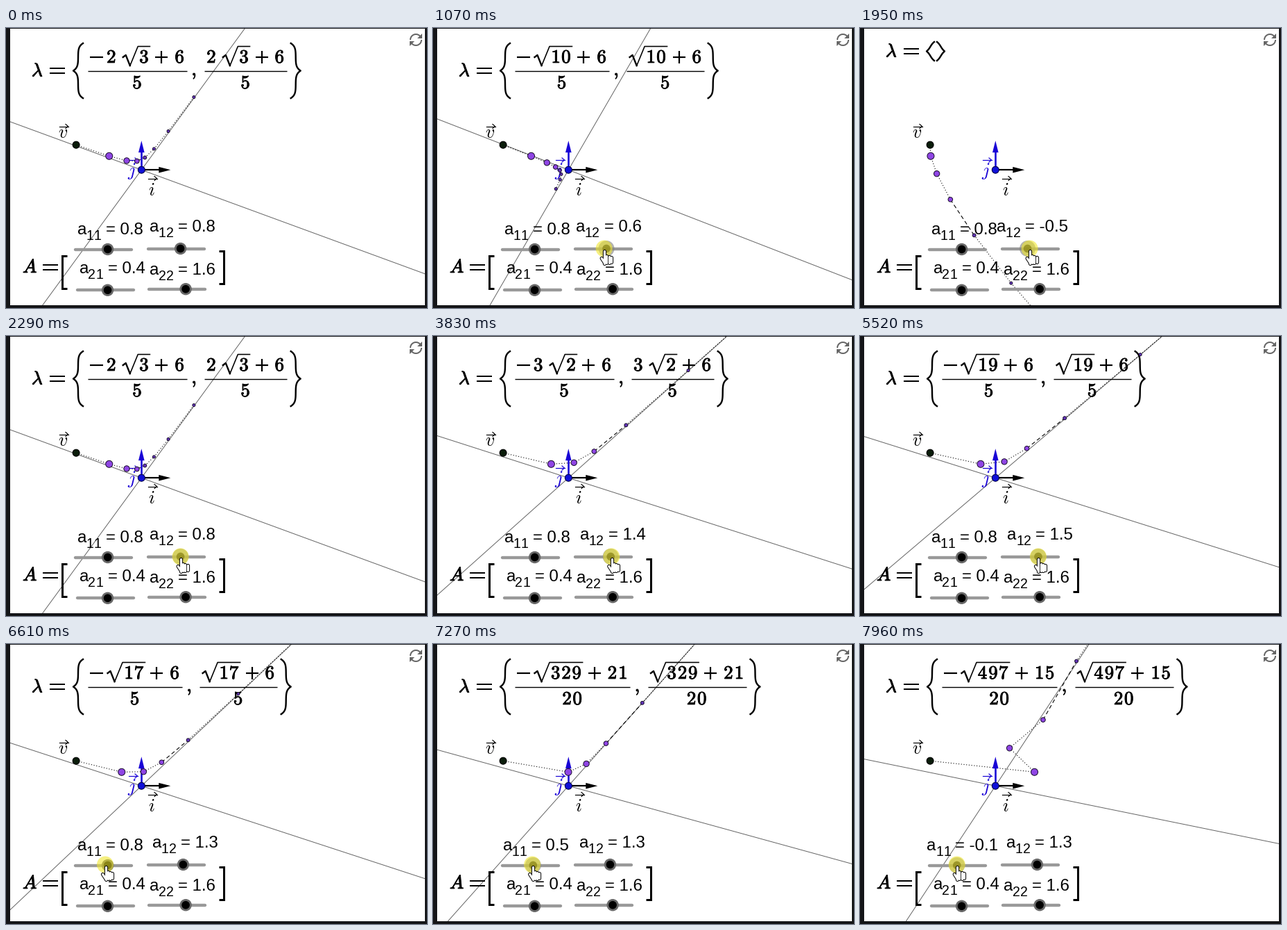
A matplotlib script for the animation above (8000 ms loop, 607 by 403 pixels).

```python
import math
import numpy as np
import matplotlib.pyplot as plt
from matplotlib.animation import FuncAnimation
from matplotlib.patches import Arc, Circle, Polygon, Rectangle
import matplotlib.patheffects as pe

W, H, DPI = 607, 403, 64          # dpi 64 keeps the pixel size exact
PT = 72 / DPI                     # points per pixel
STEP, FRAMES = 40, 200

plt.rcParams["mathtext.fontset"] = "cm"
plt.rcParams["font.family"] = "Liberation Sans"

fig = plt.figure(figsize=(W / DPI, H / DPI), dpi=DPI, facecolor="white")
ax = fig.add_axes([0, 0, 1, 1])
ax.set_xlim(0, W)
ax.set_ylim(H, 0)
ax.axis("off")

ORIGIN = np.array([195.3, 204.2])
FLIP = np.array([1, -1])
START = np.array([-94.2, 36.0])
BLUE, PURPLE, INK, GREY = "#1800d6", "#8f45e4", "#000000", "#666666"

# name: track middle, track y, label offset from the knob, text baseline
SLIDERS = {
    "11": (140.5, 318.5, -43.5, 297),
    "12": (245.4, 317.5, -44.5, 293),
    "21": (143.5, 377.3, -41, 353),
    "22": (246.8, 375.7, -51.8, 355),
}
MATRIX = {"11": .8, "12": .8, "21": .4, "22": 1.6}

# slider, begin, end, value reached
DRAGS = [
    ("12", 1030, 1470, -1.2), ("12", 1760, 2290, .8), ("12", 2520, 2840, 1.3),
    ("12", 3790, 4260, 2.1), ("12", 4620, 5390, 1.8), ("12", 5480, 5520, 1.5),
    ("12", 5680, 5860, 1.3),
    ("11", 6650, 6810, .7), ("11", 7040, 7410, .3), ("11", 7580, 7960, -.1),
]
LEAD = 100                        # the pointer runs ahead of the knob, in ms

live = []


def keep(artist):
    live.append(artist)
    return artist


def ramp(t, begin, end):
    return min(max((t - begin) / (end - begin), 0), 1)


def setting(name, t):
    v = MATRIX[name]
    for slider, begin, end, goal in DRAGS:
        if slider == name:
            v += (goal - v) * ramp(t, begin, end)
    return v


def knob_x(name, value):
    return SLIDERS[name][0] + 7.7 * value


def line(xs, ys, width=1.0, color=INK, z=4, **kw):
    return keep(ax.plot(xs, ys, lw=width * PT, color=color, zorder=z, **kw)[0])


def stroke(x0, y0, x1, y1, width):
    line([x0, x1], [y0, y1], width, solid_capstyle="butt")


def disc(x, y, r, color, z=5, edge="none", **kw):
    keep(ax.add_patch(Circle((x, y), r, fc=color, ec=edge, lw=PT, zorder=z, **kw)))


def text(x, y, s, size, color=INK, ha="left", bold=0.0):
    t = keep(ax.text(x, y, s, fontsize=size * PT, color=color, ha=ha,
                     va="baseline", zorder=4))
    if bold:
        t.set_path_effects([pe.withStroke(linewidth=bold * PT, foreground=color)])


def bold_char(x, y, c):
    text(x, y, rf"$\mathbf{{{c}}}$", 27, ha="center", bold=.9)


def equals(x, y):
    for dy in (-3.6, 3.6):
        stroke(x, y + dy, x + 22, y + dy, 2)


def brace(x, yc, h, w, side):
    """Curly brace; side 1 opens right, -1 opens left."""
    s = np.linspace(-1, 1, 81)
    p = h / 9
    bend = np.abs(s) ** p - (1 - np.abs(s)) ** p
    line(x + w / 2 * (1 + side * bend), yc + s * h / 2, 2.4)


ADVANCE = {"-": 24, "+": 36, " ": 7, "r": 25}


def width(s):
    return sum(ADVANCE.get(c, 15.2) for c in s)


def formula(s, x, base):
    """Draw digits, signs and a radical ('r') from left to right."""
    mid = base - 8
    for k, c in enumerate(s):
        step = ADVANCE.get(c, 15.2)
        if c == "-":
            stroke(x, mid, x + 19, mid, 2.2)
        elif c == "+":
            cx = x + 17.5
            stroke(cx - 9, mid, cx + 9, mid, 2.2)
            stroke(cx, mid - 9, cx, mid + 9, 2.2)
        elif c == "r":
            top, end = base - 23.5, x + step + width(s[k + 1:].split("+")[0]) + .5
            line([x + 2, x + 6, x + 12], [mid, mid - 3, base + 4], 2.4)
            line([x + 12, x + 23.5, end], [base + 4.5, top, top], 1.6)
        elif c != " ":
            bold_char(x + step / 2, base, c)
        x += step


def eigenvalues(a11, a12, a21, a22):
    """Exact eigenvalues as (numerator, denominator) strings."""
    p, q, r, s = (round(10 * v) for v in (a11, a12, a21, a22))
    tr, d = p + s, (p - s) ** 2 + 4 * q * r
    if d < 0:
        return []
    root = math.isqrt(d)
    if root * root == d:
        pairs = [(n, math.gcd(n, 20)) for n in sorted({tr - root, tr + root})]
        return [(str(n // g), str(20 // g)) for n, g in pairs]
    k = max(n for n in range(1, root + 1) if d % (n * n) == 0)
    g = math.gcd(tr, k, 20)
    coef = "" if k == g else f"{k // g} "
    body = f"{coef}r{d // (k * k)}+{tr // g}"
    return [("-" + body, str(20 // g)), (body, str(20 // g))]


def draw_lambda(values):
    surd = any("r" in n for n, _ in values)
    yc, h = (61.5, 79) if surd else (52.5, 65) if values else (33.5, 27)
    text(37, yc + 8, r"$\lambda$", 27, bold=1)
    equals(63, yc)
    if not values:
        brace(96, yc, h, 11, 1)
        brace(111, yc, h, 11, -1)
        return
    brace(97, yc, h, 14, 1)
    x, pad = 118, 2.5 if surd else 0
    for k, (num, den) in enumerate(values):
        if k:
            bold_char(x + 10.5, yc + 6.5, ",")
            x += 25.5
        w = width(num) + 2 * pad
        if den == "1":
            formula(num, x + pad, yc + 8)
        else:
            stroke(x, yc, x + w, yc, 1.4)
            formula(num, x + pad, yc - 11.5)
            formula(den, x + (w - width(den)) / 2, yc + 25.5)
        x += w
    brace(x + 6, yc, h, 14, -1)


def draw_orbit(mat):
    roots = np.linalg.eigvals(mat)
    if np.allclose(roots.imag, 0):
        for v in roots.real:
            # (a11 - v) x + a12 y = 0
            way = np.array([mat[0, 1], v - mat[0, 0]]) * FLIP
            way *= 900 / np.hypot(*way)
            line(*np.transpose([ORIGIN - way, ORIGIN + way]), 1, GREY, 1)
    pts = [START]
    for _ in range(7):
        pts.append(mat @ pts[-1])
    pts = ORIGIN + np.array(pts) * FLIP
    for k in range(7):
        dash = (5, 3.5) if k == 3 else (1, 2.4)
        line(*pts[k:k + 2].T, 1.1, INK, 2, linestyle=(0, dash),
             dash_capstyle="butt")
    for k in range(7, 0, -1):
        disc(*pts[k], np.clip(5.9 - .87 * k, 2, 5),
             PURPLE if k < 4 else "#6536bd", z=6, edge="#1c1030")


def draw_slider(name, value, active):
    mid, y, shift, base = SLIDERS[name]
    x = knob_x(name, value)
    line([mid - 40.5, mid + 40.5], [y, y], 4.4, "#999999", 3,
         solid_capstyle="round")
    if active:
        disc(x, y, 11.5, "#808080", 3.4, alpha=.6)
    else:
        disc(x, y, 8.7, "#696969", 3.5)
    disc(x, y, 5.8, INK, 3.6, alpha=.75 if active else 1)
    left = x + shift
    text(left, base, "a", 24)
    for k, digit in enumerate(name):
        text(left + 12.8 + 11 * k, base + 8.3, digit, 19.5)
    text(left + 41, base, f"= {value:.1f}", 24)


def draw_hand(x, y):
    for w, color, z in ((5.2, INK, 10), (3.2, "white", 11)):
        for k in range(4):
            top = 2 if k == 0 else 9 + .7 * k
            line([x + 3.2 * k] * 2, [y + top, y + 20 - .5 * k], w, color, z,
                 solid_capstyle="round")
        line([x - 4, x], [y + 13, y + 19], w, color, z, solid_capstyle="round")


def pointer(t):
    """Pointer place: glide in, follow the knob, cross to the other slider."""
    y = SLIDERS["12"][1]
    if t < 870:
        u = 1 - (1 - ramp(t, 260, 870)) ** 2
        return np.array([302, 376]) * (1 - u) + np.array([251.5, y]) * u
    if t > 6680:
        return knob_x("11", setting("11", t + LEAD)), y
    x = knob_x("12", setting("12", t + LEAD))
    return x + (143 - x) * ramp(t, 5860, 6480), y


def draw_pointer(t):
    x, y = pointer(t)
    disc(x, y, 12, "#f0e628", 8, alpha=.58)
    draw_hand(x + .5, y + 1)


def arrow(d, color, w):
    """Basis vector from the origin with a slim head."""
    d = np.array(d)
    n = d[::-1] * 4.3
    tip, neck = ORIGIN + 42 * d, ORIGIN + 25 * d
    line(*np.transpose([ORIGIN, neck]), w, color, 5)
    ax.add_patch(Polygon([tip, neck + n, neck - n], fc=color, ec="none", zorder=5))


def vector_label(s, x, base, left, y, color):
    text(x, base, f"${s}$", 26, color, ha="center")
    tip = left + 12.5
    line([left, tip], [y, y], 1.2, color)
    line([tip - 3.5, tip, tip - 3.5], [y - 3, y, y + 3], 1.2, color)


def draw_static():
    for x, y, w, h in ((0, 0, 6, H), (604, 0, 3, H), (0, 0, W, 1), (0, 399, W, 4)):
        ax.add_patch(Rectangle((x, y), w, h, fc="#141518", ec="none", zorder=9))
    arrow((1, 0), INK, 2.2)
    arrow((0, -1), BLUE, 2.6)
    disc(*ORIGIN, 5, "#1010d8", 7, "#000040")
    disc(*(ORIGIN + START * FLIP), 5, "#0a1c0a", 7, INK)
    vector_label("v", 82.5, 158, 77, 141.5, INK)
    vector_label("i", 209.5, 241, 205, 216.5, INK)
    vector_label("j", 181.5, 213, 177, 190, BLUE)
    text(24, 352, "$A$", 27, bold=1)
    equals(53, 344.5)
    for x, y, side in ((81, 351.5, 1), (314.3, 344.7, -1)):
        arm = x + 7 * side
        line([arm, x, x, arm], y + 23.5 * np.array([-1, -1, 1, 1]), 3,
             solid_joinstyle="miter", solid_capstyle="butt")
    # reload icon
    for start, sign in ((180, 1), (0, -1)):
        ax.add_patch(Arc((591, 17), 16, 16, theta1=start, theta2=start + 145,
                         ec=GREY, lw=2 * PT, zorder=4))
        head = np.array([(9, -9), (9, -2), (2, -2)]) * sign + (591, 17)
        ax.add_patch(Polygon(head, fc=GREY, ec="none", zorder=4))
    live.clear()


def update(i):
    while live:
        live.pop().remove()
    t = i * STEP + 30
    vals = {name: round(setting(name, t), 1) + 0.0 for name in MATRIX}
    active = "11" if t > 6680 else "12" if 870 < t < 5900 else None
    draw_orbit(np.reshape(list(vals.values()), (2, 2)))
    draw_lambda(eigenvalues(*vals.values()))
    for name, value in vals.items():
        draw_slider(name, value, name == active)
    if t >= 260:
        draw_pointer(t)
    return []


draw_static()
anim = FuncAnimation(fig, update, frames=FRAMES, interval=STEP,
                     repeat=True, repeat_delay=0, blit=False)
plt.show()
```
